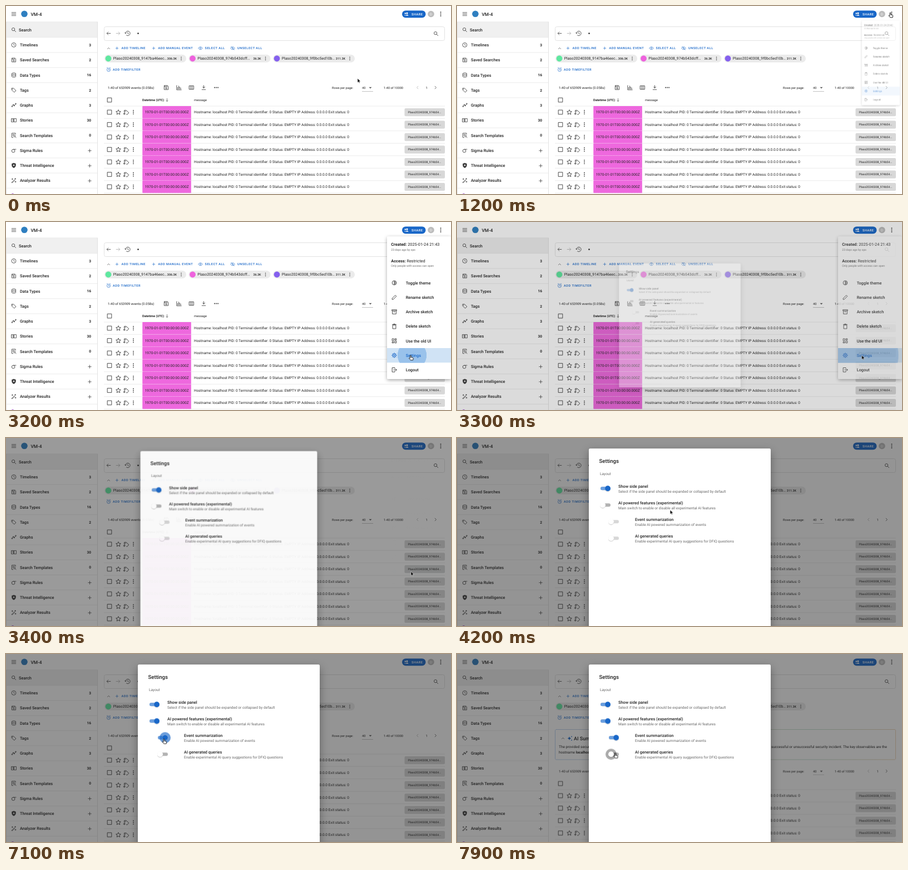
Recreate the animation shown at these times as an HTML page. Size 800 px wide and 340 px high, loop 8 s.

```html
<!DOCTYPE html>
<html lang="en">
<head>
<meta charset="utf-8">
<title>Sketch settings</title>
<style>
html, body { margin: 0; width: 100%; height: 100%; overflow: hidden; background: #fff; }
svg { display: block; width: 800px; height: 340px; font-family: Roboto, sans-serif; text-rendering: geometricPrecision; }
text { fill: #212121; white-space: pre; }
.blue { fill: #1967c8; }
.white { fill: #fff; }
.dim { fill: #666; }
.med { font-weight: 500; }
.bold { font-weight: 700; }
.btn { font-weight: 500; letter-spacing: .5px; }
.end { text-anchor: end; }
.mid { text-anchor: middle; }
.icon { fill: none; stroke: #3a3a3a; stroke-width: 1.9; }
.icon.blue { fill: none; stroke: #1967c8; }
.icon.pale { stroke: #aaa; }
.icon.solid { fill: #3a3a3a; fill-rule: evenodd; stroke-width: 1; }
.line { stroke: #e2e2e2; }

#cursor, #arrow, #hand, #menu, #hot, #ripple, #veil, #dialog, #table, #summary, #answer,
.knob, .lit, .ring, .off { animation: 8s infinite both; }

#cursor { animation-name: travel; animation-timing-function: ease-in-out; }
@keyframes travel {
  0%, 1% { transform: translate(632px, 131px); }
  11%, 16% { transform: translate(779px, 12px); }
  26% { transform: translate(716.5px, 235px); }
  29% { transform: translate(717px, 235px); }
  34%, 41% { transform: translate(727.5px, 241px); }
  42%, 45.2% { transform: translate(728px, 241.5px); }
  48.75%, 50.3% { transform: translate(394px, 131px); }
  61%, 75.2% { transform: translate(270.5px, 121.5px); }
  80%, 93.2% { transform: translate(284px, 153.5px); }
  96.8%, 100% { transform: translate(284.5px, 179.5px); }
}
#arrow { animation-name: arrow; animation-timing-function: step-end; }
@keyframes arrow { 0% { opacity: 1; } 10.5% { opacity: 0; } 41.2% { opacity: 1; } 59%, 100% { opacity: 0; } }
#hand { animation-name: hand; animation-timing-function: step-end; }
@keyframes hand { 0% { opacity: 0; } 10.5% { opacity: 1; } 41.2% { opacity: 0; } 59%, 100% { opacity: 1; } }

#menu { animation-name: menu; transform-origin: 790px 26px; }
@keyframes menu {
  0%, 14% { opacity: 0; transform: scale(.2); }
  17.5%, 41% { opacity: 1; transform: none; }
  42.8%, 100% { opacity: 0; transform: none; }
}
#hot { animation-name: hot; }
@keyframes hot { 0%, 24% { opacity: .12; } 26%, 100% { opacity: .2; } }
#ripple { animation-name: ripple; transform-origin: 730px 241px; }
@keyframes ripple {
  0%, 38.2% { opacity: 0; transform: scale(.2); }
  40% { opacity: .3; transform: scale(1); }
  42%, 100% { opacity: .3; transform: scale(2.6); }
}
#veil { animation-name: veil; }
@keyframes veil { 0%, 40.9% { opacity: 0; } 42.5% { opacity: .45; } 44%, 100% { opacity: .48; } }
#dialog { animation-name: dialog; transform-origin: 400.5px 187px; }
@keyframes dialog {
  0%, 40.9% { opacity: 0; transform: scale(.5); }
  42.5% { opacity: .94; transform: scale(.972); }
  44.4%, 100% { opacity: 1; transform: none; }
}

#s1 .knob { animation-name: slide1; }
@keyframes slide1 { 0%, 66.9% { transform: none; } 70%, 100% { transform: translateX(9px); } }
#s1 .lit { animation-name: lit1; }
@keyframes lit1 { 0%, 66.9% { opacity: 0; } 69.5%, 100% { opacity: 1; } }
#s1 .ring { animation-name: ring1; }
@keyframes ring1 {
  0%, 59% { opacity: 0; fill: #000; }
  61%, 66.9% { opacity: .33; fill: #000; }
  69.5% { opacity: .65; fill: #1967c8; }
  75.5% { opacity: .4; fill: #1967c8; }
  77.5%, 100% { opacity: 0; fill: #1967c8; }
}
#s2 .knob { animation-name: slide2; }
@keyframes slide2 { 0%, 85.6% { transform: none; } 88.9%, 100% { transform: translateX(9px); } }
#s2 .lit { animation-name: lit2; }
@keyframes lit2 { 0%, 85.6% { opacity: 0; } 88.6%, 100% { opacity: 1; } }
#s2 .ring { animation-name: ring2; }
@keyframes ring2 {
  0%, 77.7% { opacity: 0; fill: #000; }
  80%, 85.6% { opacity: .33; fill: #000; }
  88.6% { opacity: .65; fill: #1967c8; }
  93.5% { opacity: .4; fill: #1967c8; }
  95%, 100% { opacity: 0; fill: #1967c8; }
}
#s3 .ring { animation-name: ring3; }
@keyframes ring3 { 0%, 95.2% { opacity: 0; } 97.2%, 100% { opacity: .33; } }
#s2 .off, #s3 .off { animation-name: enable; }
@keyframes enable { 0%, 66.9% { opacity: .16; } 69%, 100% { opacity: .3; } }
#s0 .lit { opacity: 1; }
#s3 .lit, #s0 .ring { opacity: 0; }
#s0 .knob { transform: translateX(9px); }

#table { animation-name: shift; animation-timing-function: step-end; }
@keyframes shift { 0% { transform: none; } 92%, 100% { transform: translateY(64.3px); } }
#summary { animation-name: show; animation-timing-function: step-end; }
@keyframes show { 0% { opacity: 0; } 92%, 100% { opacity: 1; } }
#answer { animation-name: fill; animation-timing-function: step-end; }
@keyframes fill { 0% { opacity: 0; } 96%, 100% { opacity: 1; } }
</style>
</head>
<body>
<svg id="stage" viewBox="0 0 800 340"></svg>
<script>
const ring = (x, y, r) => `M${x + r} ${y}a${r} ${r} 0 1 1-${2 * r} 0a${r} ${r} 0 1 1 ${2 * r} 0`;

// Icon outlines on a 24 unit grid
const icons = {
  menu: 'M3 6h18M3 12h18M3 18h18',
  search: ring(10, 10, 6) + 'M14.5 14.5L21 21',
  clock: ring(12, 12, 9) + 'M12 7v5l4 2.5',
  save: 'M4 4h13l3 3v13H4zM7 5v4h8V5' + ring(12, 15, 2.5),
  data: 'M20 6c0 2-3.6 3-8 3s-8-1-8-3 3.6-3 8-3 8 1 8 3v12c0 2-3.6 3-8 3s-8-1-8-3V6M4 12c0 2 3.6 3 8 3s8-1 8-3',
  tag: 'M3 4h8l10 10-7 7L3 11z' + ring(7, 8, 1),
  tagPlus: 'M5 5h7l10 9-7 8-3-3M5 5v7l3 3' + ring(9, 9, 1) + 'M5 14v8M1 18h8',
  graph: 'M5 17l5-7 4 4 6-8' + ring(5, 17, 2) + ring(10, 10, 1.5) + ring(14, 14, 1.5) + ring(20, 6, 2),
  book: 'M2 5h9v14H2zM13 5h9v14h-9zM5 9h3M5 13h3',
  template: 'M19 9V3H4v18h6M7 8h8M7 12h4' + ring(15, 15, 3.5) + 'M18 18l4 4',
  sigma: ring(10, 14, 6.5) + 'M10 7.5h12',
  shield: 'M12 2l8 3v6c0 5-3.4 9-8 11-4.6-2-8-6-8-11V5z' + ring(12, 11, 3.5),
  wand: 'M3 20L14 9l2 2L5 22zM18 2v6M15 5h6M6 3v6M3 6h6M19 14v6M16 17h6',
  plus: 'M12 4v16M4 12h16',
  back: 'M21 12H4M11 5l-7 7 7 7',
  next: 'M3 12h17M13 5l7 7-7 7',
  down: 'M12 3v17M6 14l6 6 6-6',
  history: 'M4 12a9 9 0 1 1 3 6.7M1 9l3 4 4-4M13 7v5l4 2.5',
  up: 'M5 16l7-7 7 7',
  left: 'M15 5l-7 7 7 7',
  right: 'M9 5l7 7-7 7',
  eye: 'M1 12q11-14 22 0q-11 14-22 0z' + ring(12, 12, 3),
  noeye: 'M1 12q11-14 22 0q-11 14-22 0zM3 3l18 18' + ring(12, 12, 2),
  timer: ring(12, 13, 8) + 'M12 9v4h4M3 4l4-2M21 4l-4-2',
  chart: 'M3 3v18h19M7 18V11M11 18V5M15 18V9M19 18v-5',
  columns: 'M3 5h18v14H3zM9 5v14M15 5v14',
  load: 'M12 3v11M7 9l5 5 5-5M4 20h16',
  box: 'M4 4h16v16H4z',
  star: 'M12 3l2.7 6 6.3.6-4.8 4.4 1.5 6.5-5.7-3.5-5.7 3.5 1.5-6.5L3 9.6l6.3-.6z',
  theme: ring(12, 12, 8) + 'M12 5v14M12 8h5M12 12h7M12 16h5',
  pen: 'M4 20v-4L16 4l4 4L8 20z',
  archive: 'M3 4h18v4H3zM5 8v12h14V8M9 12h6',
  trash: 'M6 7h12v14H6zM4 5h16M9 3h6',
  grid: 'M4 4h6v8H4zM14 4h6v4h-6zM14 12h6v8h-6zM4 16h6v4H4z',
  gear: ring(12, 12, 6.5) + ring(12, 12, 2.5) + 'M12 2v4M12 18v4M2 12h4M18 12h4M5 5l3 3M16 16l3 3M19 5l-3 3M8 16l-3 3',
  exit: 'M14 8V4H4v16h10v-4M9 12h12M17 8l4 4-4 4'
};

const icon = (name, x, y, size = 11, cls = '') =>
  `<path class="icon ${cls}" d="${icons[name]}" transform="translate(${x - size / 2} ${y - size / 2}) scale(${size / 24})"/>`;
const text = (x, y, size, str, cls = '') =>
  `<text x="${x}" y="${y}" font-size="${size}" class="${cls}">${str}</text>`;
const rect = (x, y, w, h, fill, more = '') =>
  `<rect x="${x}" y="${y}" width="${w}" height="${h}" fill="${fill}" ${more}/>`;
const dot = (x, y, r, fill, more = '') => `<circle cx="${x}" cy="${y}" r="${r}" fill="${fill}" ${more}/>`;
const line = (x, y, w) => `<path class="line" d="M${x} ${y}h${w}" stroke-width=".7"/>`;
const dots = (x, y, gap = 3, r = .9) => [-gap, 0, gap].map(d => dot(x, y + d, r, '#333')).join('');
const each = (list, fn) => list.map(fn).join('');

function header() {
  return icon('menu', 14, 14.5, 11) + dot(33, 14.3, 5.8, '#2f7fc0') +
    text(44.4, 17.6, 8.3, 'VM-4', 'med') +
    rect(712, 8.2, 42.5, 13, '#1967c8', 'rx="6.5"') +
    dot(721, 13, 1.6, '#fff') + dot(717.8, 13.4, 1.2, '#fff') +
    '<path d="M716 17.200q1.500-2 3 0zM718.500 17.600q2.500-4 5.200 0z" fill="#fff"/>' +
    text(729, 16.8, 5.67, 'SHARE', 'btn white') +
    dot(764, 14.5, 5.8, '#bdbdbd') + text(764, 16.7, 6, 'D', 'mid white') +
    dots(781.5, 14.5, 3.2, 1);
}

function sidebar() {
  const items = [
    ['Timelines', 'clock', 3], ['Saved Searches', 'save', 2], ['Data Types', 'data', 16],
    ['Tags', 'tag', 2], ['Graphs', 'graph', 3], ['Stories', 'book', 30],
    ['Search Templates', 'template', 0], ['Sigma Rules', 'sigma'],
    ['Threat Intelligence', 'shield'], ['Analyzer Results', 'wand']
  ];
  return rect(0, 29, 164, 27.5, '#f0f0f0') + line(0, 28.7, 165) +
    icon('search', 14, 43, 10.5) + text(23, 45.7, 7.4, 'Search', 'med') + line(0, 56.7, 164) +
    each(items, ([name, pic, count], i) => {
      const y = 70.4 + 27.25 * i;
      return icon(pic, 14, y, 10.5, pic == 'shield' ? 'solid' : '') +
        text(25, y + 2.6, 7.37, name, 'med') +
        (count === undefined ? icon('plus', 150.5, y + .5, 9.5) : text(153, y + 2.5, 6.5, count, 'bold end')) +
        line(0, y + 13.7, 164);
    }) +
    dot(12, 341.5, 2.5, '#a455c8') +
    '<path class="line" d="M164.500 29v311M.5 29v311" stroke="#ddd"/>';
}

function chip(x, w, color, name, count) {
  return rect(x, 88, w, 14, '#ebebeb', 'rx="7"') + dot(x + 7, 95, 5.4, color) +
    text(x + 15.7, 97.4, 6.8, 'Plaso20240308_' + name + '…') +
    text(x + w - 17, 97, 5.4, count, 'med end') + dots(x + w - 9, 95, 2.4, .75);
}

function filters() {
  const buttons = [
    ['plus', 199.5, 'ADD TIMELINE', 207.5], ['plus', 265.5, 'ADD MANUAL EVENT', 273.5],
    ['eye', 349.5, 'SELECT ALL', 357.5], ['noeye', 407.5, 'UNSELECT ALL', 416]
  ];
  return rect(176.5, 37.5, 612, 25, '#fff', 'rx="3" stroke="#e2e2e2"') +
    icon('back', 184.5, 49.5, 10) + icon('next', 201.5, 49.5, 10, 'pale') +
    icon('history', 218.5, 49.5, 11) + dot(237.5, 49.6, 1.4, '#333') + icon('search', 773, 50, 10.5) +
    icon('up', 184.5, 76.5, 8) +
    each(buttons, ([pic, ix, label, x]) =>
      icon(pic, ix, 76.3, pic == 'plus' ? 8 : 8.5, 'blue') + text(x, 78.4, 5.67, label, 'btn blue')) +
    chip(177, 147, '#5fe8a0', '9147ba46eec', '306.3K') +
    chip(328.5, 147, '#ee62dd', '974b543dcff', '36.3K') +
    chip(480, 147, '#8560ee', '9f0bc5ed10b', '311.3K') +
    icon('timer', 184.5, 115, 9, 'blue') + text(192, 116.8, 5.67, 'ADD TIMEFILTER', 'btn blue');
}

function row(i) {
  const y = 192 + 22.5 * i;
  return line(176, y + 11.3, 613) + rect(245, y - 11, 88, 22.5, '#ee68de') +
    `<path d="M245 ${y + 11.3}h88" stroke="#fff" stroke-width=".8" stroke-dasharray="1.5 1"/>` +
    icon('box', 186, y, 11.5) + icon('star', 202, y, 11.5) + icon('tagPlus', 216, y, 11.5) + dots(229, y, 3.1, .9) +
    text(249.7, y + 2.3, 6.55, '1970-01-01T00:00:00.000Z') +
    text(338, y + 2.3, 6.53, 'Hostname: localhost PID: 0 Terminal identifier: 0 Status: EMPTY IP Address: 0.0.0.0 Exit status: 0') +
    rect(716.5, y - 7, 72.5, 14.3, '#d8d8d8', 'rx="2"') +
    text(722.5, y + 1.9, 5.15, 'Plaso20240308_974b54...');
}

function table() {
  const tools = [['save', 288], ['chart', 311], ['columns', 333.3], ['load', 355.5]];
  return '<g id="table">' + text(183, 149.8, 6, '1-40 of 653909 events (0.058s)') +
    each(tools, ([pic, x]) => icon(pic, x, 147.5, 11)) +
    each([375, 378, 381], x => dot(x, 147.5, 1, '#333')) +
    text(586, 149.6, 5.6, 'Rows per page:') + text(640, 149.6, 5.67, '40') +
    '<path d="M652.500 146.700h5l-2.500 2.600z" fill="#555"/><path d="M640 154.500h20" stroke="#999" stroke-width=".6"/>' +
    text(679, 149.6, 5.67, '1-40 of 10000') +
    icon('left', 740, 147.5, 9, 'pale') + text(754.5, 149.6, 5.67, '1') + icon('right', 772, 147.5, 9) +
    icon('box', 186, 170, 11.5) + text(245, 172, 5.67, 'Datetime (UTC)', 'bold') + icon('down', 289.5, 170, 8) +
    text(338, 172, 5.67, 'message') + line(176, 181, 613) +
    each([0, 1, 2, 3, 4, 5, 6], row) +
    '<path d="M245.200 181v159M333 181v159" stroke="#fff" stroke-width=".6" stroke-dasharray="1.5 1"/></g>';
}

function summary() {
  return '<g id="summary"><linearGradient id="rim"><stop stop-color="#6f9fe0"/><stop offset=".4" stop-color="#d8a070"/>' +
    '<stop offset=".75" stop-color="#7fbf9f"/><stop offset="1" stop-color="#d8a870"/></linearGradient>' +
    rect(176.5, 136.5, 612, 54.5, '#fff', 'rx="2" stroke="url(#rim)" stroke-dasharray="1 1"') +
    icon('up', 190.5, 152.5, 8) +
    '<path class="blue" d="M202 149q.5 3 3.500 3.500q-3 .5-3.500 3.500q-.5-3-3.500-3.500q3-.5 3.500-3.500z"/>' +
    dot(206, 149.3, .9, '#1967c8') + dot(206, 155.7, .9, '#1967c8') +
    text(210, 155.6, 9, 'AI Summary', 'med') +
    '<g id="answer">' + text(183, 169.8, 6.5, 'The provided security events') +
    text(773, 169.8, 6.4, 'successful or unsuccessful security incident. The key observables are the', 'end') +
    text(183, 180, 6.5, 'hostname <tspan font-weight="700">localhost</tspan>') + '</g></g>';
}

function menu() {
  const items = [['Toggle theme', 'theme'], ['Rename sketch', 'pen'], ['Archive sketch', 'archive'],
    ['Delete sketch', 'trash'], ['Use the old UI', 'grid'], ['Settings', 'gear'], ['Logout', 'exit']];
  return '<g id="menu">' + rect(685, 26, 115, 258, '#fff', 'rx="2.5" filter="url(#soft)"') +
    text(692.3, 42.7, 7.37, '<tspan font-weight="700">Created:</tspan> 2025-01-24 21:43') +
    text(692.3, 51.7, 5.1, '23 days ago by ops', 'dim') +
    text(692.3, 72.7, 7.37, '<tspan font-weight="700">Access:</tspan> Restricted') +
    text(692.3, 81.4, 5.1, 'Only people with access can open', 'dim') +
    rect(685, 228, 115, 26.3, '#1976d2', 'id="hot"') +
    '<clipPath id="item"><path d="M685 228h115v26.300h-115z"/></clipPath>' +
    `<g clip-path="url(#item)">${dot(730, 241, 26, '#1976d2', 'id="ripple"')}</g>` +
    each(items, ([name, pic], i) => {
      const y = 110 + 26.23 * i, cls = name == 'Settings' ? 'blue' : '';
      return icon(pic, 698, y, 11.5, cls) + text(718.7, y + 2.6, 7.37, name, 'med ' + cls);
    }) + '</g>';
}

function toggle(i, x, y, title, note) {
  const lit = shape => shape.replace('/>', ' class="lit"/>');
  const left = x + (i > 1 ? 47 : 32);
  return `<g id="s${i}"><g transform="translate(${x} ${y})">` +
    rect(0, -3, 18, 6, '#000', 'rx="3" opacity=".3" class="off"') + lit(rect(0, -3, 18, 6, '#6a9fe0', 'rx="3"')) +
    '<g class="knob">' + dot(4, 0, 10, '#000', 'class="ring"') +
    dot(4, 0, 5, '#fff', 'filter="url(#low)"') + lit(dot(4, 0, 5, '#1967c8')) + '</g></g>' +
    text(left, y - 1.6, 7.37, title, 'med') + text(left, y + 7.3, 6.55, note, 'dim') + '</g>';
}

function dialog() {
  return '<g id="dialog">' + rect(237, 19, 327, 336, '#fff', 'rx="2.5" filter="url(#deep)"') +
    text(255.5, 45, 9.6, 'Settings', 'med') + text(257, 67.4, 6.6, 'Layout', 'dim') +
    toggle(0, 258, 91.3, 'Show side panel', 'Select if the side panel should be expanded or collapsed by default') +
    toggle(1, 258, 121.3, 'AI powered features (experimental)', 'Main switch to enable or disable all experimental AI features') +
    toggle(2, 273, 151.3, 'Event summarization', 'Enable AI powered summarization of events') +
    toggle(3, 273, 181.3, 'AI generated queries', 'Enable experimental AI query suggestions for DFIQ questions') + '</g>';
}

const shadow = (id, y, blur, alpha) =>
  `<filter id="${id}" x="-30%" y="-30%" width="160%" height="160%"><feDropShadow dx="0" dy="${y}" stdDeviation="${blur}" flood-opacity="${alpha}"/></filter>`;

const cursor = '<g id="cursor">' +
  '<path id="arrow" d="M0 0v7.500l1.800-1.600 1.200 2.700 1.100-.5-1.200-2.600h2.500z" fill="#000" stroke="#fff" stroke-width=".5"/>' +
  '<path id="hand" d="M-.9.8a.9.9 0 0 1 1.800 0v3l3 .7q1 .3.8 1.400l-.6 2.900h-4.300l-2.700-3.400q0-1.200 2 0z" fill="#fff" stroke="#111" stroke-width=".9"/></g>';

document.getElementById('stage').innerHTML =
  '<defs>' + shadow('soft', 2, 3, .35) + shadow('deep', 6, 8, .35) + shadow('low', .6, .7, .4) + '</defs>' +
  header() + sidebar() + filters() + table() + summary() + menu() +
  rect(0, 0, 800, 340, '#212121', 'id="veil"') + dialog() + cursor;
</script>
</body>
</html>
```
